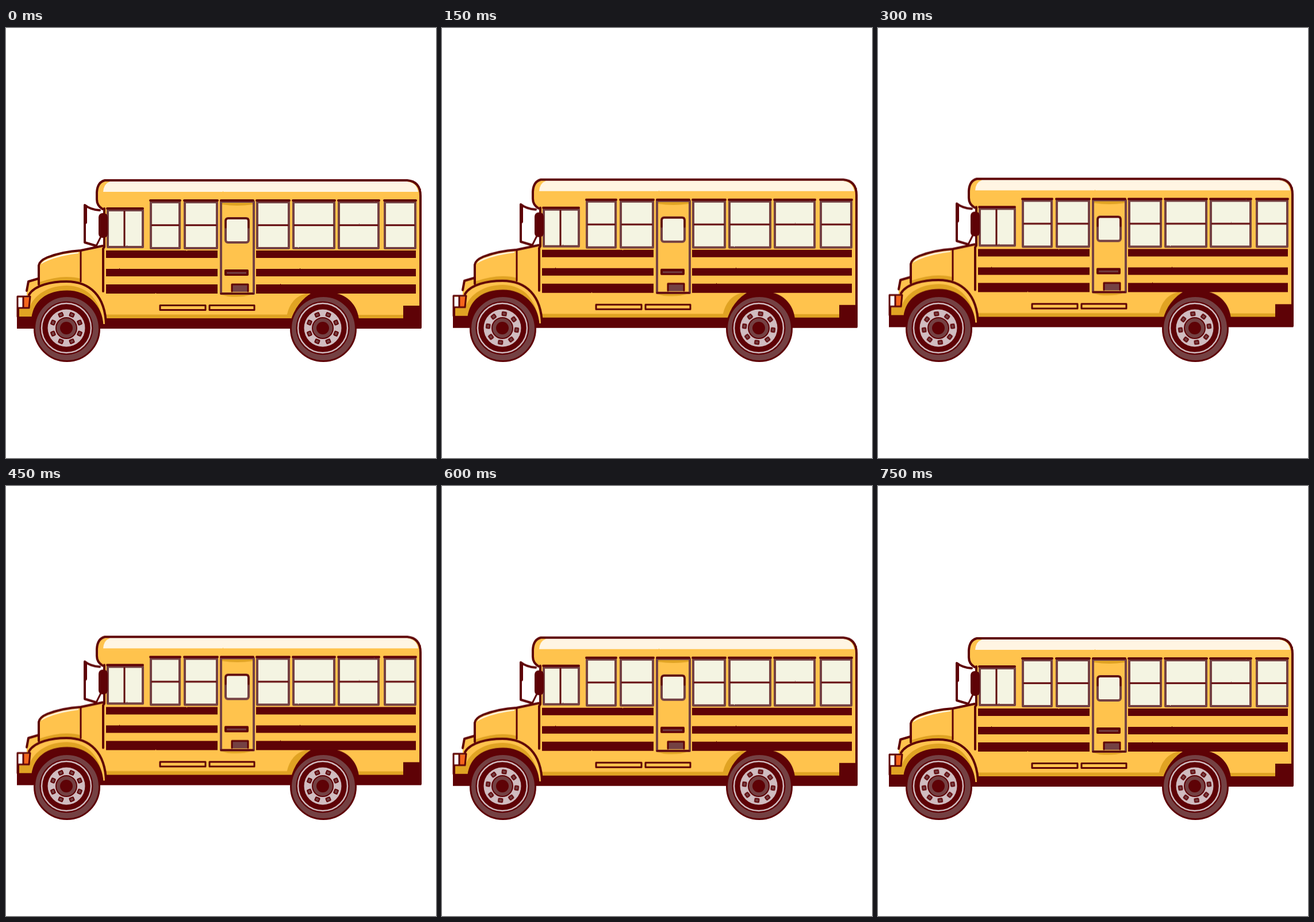
An HTML page that plays this animation: 748 by 748 pixels, repeating every 900 ms.

```html
<!DOCTYPE html>
<html lang="en">
<head>
<meta charset="utf-8">
<title>School bus</title>
<style>
  html, body { margin: 0; width: 100%; height: 100%; overflow: hidden; background: #fff; }
  svg { display: block; width: 100%; height: 100%; }
  .ink { fill: #5e0206; }
  .line { fill: none; stroke: #5e0206; stroke-width: 4; stroke-linecap: round; stroke-linejoin: round; }
  .paint { fill: #ffc34d; }
  .shade { fill: #e0a323; }
  .cream { fill: #fff5e3; }
  .glass { fill: #f4f4e2; }
  .mauve { fill: #744143; }
  .frame { stroke: #744143; stroke-width: 4; stroke-linejoin: round; }
  .rim { fill: #d0bcc0; }
  .thin { stroke-width: 3; }
  #body { animation: bob 900ms step-end infinite; }
  .wheel { animation: roll 450ms steps(3) infinite; }
  @keyframes bob {
    0%, 83.333% { transform: translateY(0); }
    16.666%, 66.666% { transform: translateY(-1.3px); }
    33.333%, 50% { transform: translateY(-2.6px); }
  }
  @keyframes roll { to { transform: rotate(-45deg); } }
</style>
</head>
<body>
<svg viewBox="0 0 748 748">
  <defs>
    <filter id="rough" x="-5%" y="-5%" width="110%" height="110%" color-interpolation-filters="sRGB">
      <feTurbulence type="fractalNoise" baseFrequency=".3" numOctaves="2" seed="4"/>
      <feDisplacementMap in="SourceGraphic" scale="1.4" xChannelSelector="R" yChannelSelector="G"/>
    </filter>
  </defs>

  <g id="body"><g filter="url(#rough)">
    <!-- cabin -->
    <path class="paint" d="M172 265H698Q721 267 721 292V508H164V381H170V314Q158 311 158 298V286Q159 268 172 265Z"/>
    <path class="cream" d="M181 267H698Q714 269 717 285H169Q170 271 181 267Z"/>
    <path class="shade" d="M172 498.5H495V507H172ZM612 499H692V507H612Z"/>
    <path class="shade" d="M488 505C490 484 502 466 522 462L545 467L500 507Z"/>
    <path class="ink" d="M162 505H721V523H162ZM691 483H722V523H691Z"/>
    <path class="ink" d="M494 522C496 498 508 476 530 462H576C598 467 612 486 614 508V522Z"/>

    <!-- hood, front lamp and bumper -->
    <path class="paint" d="M36 458L39 441L57 436V412Q59 404 72 399Q98 389 130 387L169 379V470H36Z"/>
    <path class="shade" d="M58 442Q85 433 105 433Q120 433 130 436V446L105 443L58 452Z"/>
    <path class="cream" d="M61 411Q64 404 78 400Q99 392 126 390V392Q93 396 72 405Q65 408 61 411Z"/>
    <path class="line" d="M36 457L39 441L56 436M57 446V413Q58 405 72 399Q98 389 130 387L168 379"/>
    <path class="line thin" d="M130 387V441"/>
    <path class="paint" d="M20 466H40C50 447 80 441 105 441C146 441 173 466 174 518H46V503H20Z"/>
    <path class="shade" d="M22 489H40C48 462 77 448 106 448C145 449 166 476 169 518H46V503H22Z"/>
    <path class="ink" d="M46 522V503C50 474 73 458 106 458C142 458 166 484 168 522Z"/>
    <path class="line" d="M40 464C50 447 80 441 105 441C146 441 173 466 174 517H169"/>
    <path class="line thin" d="M46 503C50 474 73 458 106 458C142 458 166 484 168 517"/>
    <path class="ink" d="M19 488H23V502H48V523H19Z"/>
    <path fill="#fff" d="M21 469H30V487H21Z"/>
    <path fill="#f4661c" d="M30 469H42L40 486H30Z"/>
    <path class="line thin" d="M20 502V467H42L40 487H21M30 469V487"/>

    <!-- cabin outline -->
    <path class="line" d="M168 315Q158 309 158 298V286Q159 268 172 265H698Q721 267 721 292V521"/>
    <path class="line" d="M171 314V381L169 384V458"/>

    <g id="windows"></g>

    <path class="glass frame" d="M177 317H238V381H177Z"/>
    <path class="line" d="M176 314H238"/>
    <path class="line thin" d="M206 319V379"/>

    <!-- door -->
    <path class="paint frame" d="M374 302H431V462H374Z"/>
    <path class="shade" d="M376 304H429V307Q402 311 376 307ZM374 464H426Q412 469 386 467Z"/>
    <path class="line" d="M374 300H430"/>
    <path class="line thin" d="M374 462H430"/>
    <rect class="glass frame" x="382" y="331" width="40" height="42" rx="4"/>
    <path class="line thin" d="M382 347V336Q382 331 387 331H417Q422 331 422 336V347"/>
    <rect class="ink" x="380" y="420" width="42" height="11" rx="2"/>
    <path class="frame" d="M384 426H418" style="stroke-width:3"/>
    <path class="mauve" d="M393 446H421V459H393Z"/>
    <path class="line thin" d="M393 458V446H421V458"/>

    <!-- side stripes and vents -->
    <path class="ink" d="M174 387H368V400H174ZM174 419H368V432H174ZM174 446H368V462H174Z"/>
    <path class="ink" d="M435 387H713V400H435ZM435 419H713V432H435ZM435 446H713V462H435Z"/>
    <path class="line thin" d="M268 482.5H347V490.5H268ZM354 482.5H432V490.5H354Z"/>

    <!-- mirror -->
    <path fill="#fff" d="M136 308Q147 316 164 317V372L157 379L137 373Z"/>
    <path class="line" d="M163 317Q147 316 137 308V373L157 379"/>
    <path class="line" style="stroke-width:6" d="M138 311V338"/>
    <rect class="ink" x="161" y="322" width="16" height="43" rx="7"/>
    <path class="line thin" d="M165 363L157 379"/>
  </g></g>

  <g id="wheels"></g>
</svg>
<script>
  const windows = [[252, 302], [311, 367], [437, 492], [500, 571], [579, 648], [659, 712]];
  document.getElementById('windows').innerHTML = windows.map(([left, right]) => `
    <path class="glass frame" d="M${left} 303H${right}V383H${left}Z"/>
    <path class="line" d="M${left - 1} 300H${right + 1}"/>
    <path class="line thin" d="M${left + 2} 343H${right - 2}"/>`).join('');

  const circle = (r, attrs, x = 0, y = 0) => `<circle cx="${x}" cy="${y}" r="${r}" ${attrs}/>`;
  const bolts = Array.from({ length: 8 }, (_, i) =>
    `<rect class="mauve" x="-3.5" y="-28" width="7" height="6" rx="1" stroke="#5e0206"
      stroke-width="2" transform="rotate(${i * 45 + 22.5})"/>`).join('');

  const wheel = x => `<g transform="translate(${x} 522)">
    <g filter="url(#rough)">
      ${circle(56.5, 'class="mauve" stroke="#5e0206" stroke-width="3"', 1, 1)}
      ${circle(46.5, 'class="ink"')}
      ${circle(43, 'fill="none" stroke="#d0bcc0" stroke-width="2.5"')}
      ${circle(32.5, 'class="rim"')}
    </g>
    <g class="wheel">${bolts}</g>
    ${circle(18, 'class="mauve" stroke="#5e0206" stroke-width="2"')}
    ${circle(11, 'class="ink"')}
  </g>`;
  document.getElementById('wheels').innerHTML = wheel(105) + wheel(551);
</script>
</body>
</html>
```
